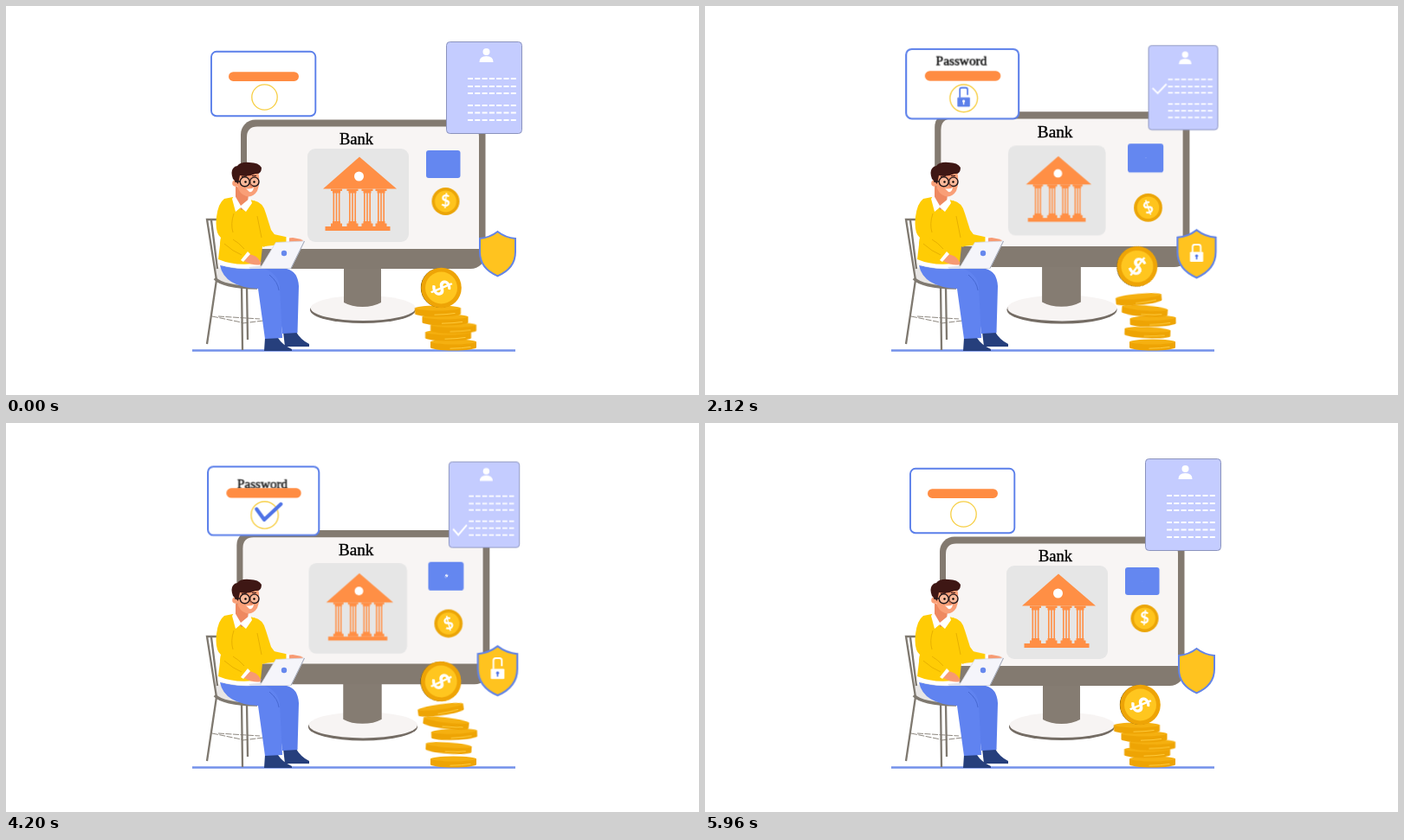
Animation, 800 px wide and 450 px high, one loop 6 s. Source, as an HTML page:

```html
<!DOCTYPE html>
<html lang="en">
<head>
<meta charset="utf-8">
<title>Secure banking</title>
<style>
  html, body { margin: 0; width: 100%; height: 100%; overflow: hidden; background: #fff; }
  svg { display: block; width: 100vw; height: 100vh; }
  text { font-family: "Liberation Serif", "Times New Roman", serif; text-anchor: middle; }
  .title { fill: #000; stroke: #000; stroke-width: .35; }
  .dollar { font-family: Lato, "Open Sans", sans-serif; font-weight: 800; fill: #fff; }

  g, path, text, rect, use { --sine: cubic-bezier(.37, 0, .63, 1); }

  /* slow six-second breathing */
  .swell { animation: swell 3s var(--sine) infinite alternate; }
  @keyframes swell { to { transform: scale(var(--s)); } }
  .card { transform-origin: 297px 90px; --s: 1.1; }
  .doc { transform-origin: 552px 94.5px; --s: .9; }
  .monitor { transform-origin: 412px 352px; --s: 1.052; }
  .panel { transform-origin: 406.5px 219px; --s: .906; }
  .bank { transform-origin: 408px 217.5px; --s: .817; }
  .shield { transform-origin: 567.5px 286.5px; --s: 1.12; animation-duration: 1.5s; }

  .drift { animation: drift 3s var(--sine) infinite alternate; }
  @keyframes drift { to { transform: translate(5px, 9px) scale(1.03); } }
  .lean { animation: lean 3s var(--sine) infinite alternate; }
  @keyframes lean { to { transform: rotate(-30deg); } }

  .word { animation: word 6s var(--sine) infinite; }
  @keyframes word {
    0%, 100% { transform: translateY(18px); }
    20%, 50% { transform: none; }
  }

  /* padlocks */
  .lock { animation: pop var(--d) var(--sine) infinite; }
  .lock .shackle { animation: open var(--d) var(--sine) infinite; }
  @keyframes pop {
    0%, 3% { transform: rotate(-180deg) scale(0); }
    28%, 76% { transform: none; }
    100% { transform: scale(0); }
  }
  @keyframes open {
    0%, 28%, 60%, 100% { transform: none; }
    37%, 50% { transform: translateY(-3.5px); }
  }
  .late { animation-name: late; }
  .late .shackle { animation-name: shut; }
  @keyframes late {
    0%, 48% { transform: rotate(90deg) scale(0); }
    67%, 82% { transform: none; }
    97%, 100% { transform: scale(0); }
  }
  @keyframes shut {
    0%, 74% { transform: translateY(-3.5px); }
    81%, 100% { transform: none; }
  }

  /* ticks */
  .tick { fill: none; stroke-dasharray: 1 2; animation: tick 3s linear infinite; }
  .second { animation-name: second; }
  @keyframes tick {
    0%, 1%, 48%, 100% { stroke-dashoffset: 1.1; }
    9%, 40.5% { stroke-dashoffset: 0; }
  }
  @keyframes second {
    0%, 50%, 97%, 100% { stroke-dashoffset: 1.1; }
    60%, 88% { stroke-dashoffset: 0; }
  }

  /* coins */
  .slab { animation: lift 3s var(--sine) infinite; }
  @keyframes lift {
    0%, 3%, 100% { transform: none; }
    43%, 50% { transform: translate(var(--x), var(--y)) rotate(var(--a)); }
  }
  .toss { animation: toss 3s var(--sine) infinite; }
  @keyframes toss {
    0%, 3%, 98%, 100% { transform: none; }
    53%, 58% { transform: translateY(-32px); }
  }
  .roll { animation: roll 3s var(--sine) infinite; }
  @keyframes roll {
    0%, 36%, 98%, 100% { transform: none; }
    58%, 63% { transform: translateX(-4px) rotate(-33deg); }
  }

  /* typing */
  .near, .far, .head { animation: 2s var(--sine) infinite; }
  .near { animation-name: near; transform-origin: 252px 270px; }
  .far { animation-name: far; }
  .head { animation-name: nod; transform-origin: 272px 224px; }
  @keyframes near { 0%, 15%, 100% { transform: none; } 45%, 72% { transform: rotate(-12deg); } }
  @keyframes far { 0%, 15%, 100% { transform: none; } 45%, 72% { transform: translate(-14px, 3px); } }
  @keyframes nod { 0%, 15%, 100% { transform: none; } 45%, 72% { transform: rotate(-2deg); } }
</style>
</head>
<body>
<svg viewBox="0 0 800 450">
  <defs>
    <clipPath id="above"><rect x="240" y="54" width="114" height="27"/></clipPath>
    <g id="column" fill="#ff8f45">
      <path d="M-6.500 211.500h13v2.500h-13zM-4.500 214h9v2.500h-9zM-4.500 249h9v2.500h-9zM-6.500 251.500h13v3.500h-13z"/>
      <path d="M-3.200 216v34M0 216v34M3.200 216v34" stroke="#ff8f45" stroke-width="1.600"/>
    </g>
    <g id="slab">
      <path d="M-26.500 -3.500v6.500a26.500 3.400 0 0 0 53 0v-6.500z" fill="#eea404"/>
      <ellipse cy="-3.500" rx="26.500" ry="2.900" fill="#f5b010"/>
      <path d="M-4 4.200q14 -.2 24 -1.800" stroke="#ffcb3c" fill="none"/>
    </g>
    <rect id="body" x="-7.700" y="-.5" width="15.400" height="11.500" rx="1"/>
    <path id="keyhole" d="M0 2.500a1.700 1.700 0 0 1 .8 3.200v2.600h-1.600v-2.600a1.700 1.700 0 0 1 .8 -3.200z"/>
    <path id="hoop" d="M-4.700 3.500v-10q0 -2.500 2.500 -2.500h4.400q2.500 0 2.500 2.500v6.500" fill="none" stroke-width="1.900"/>
  </defs>

  <!-- monitor -->
  <g class="swell monitor">
    <ellipse cx="412" cy="351.500" rx="61" ry="15.500" fill="#746c64"/>
    <ellipse cx="412.300" cy="349.500" rx="60.500" ry="14.500" fill="#f7f4f3"/>
    <path d="M390 300h43v43q-9 5 -21.500 5t-21.500 -5z" fill="#857c72"/>
    <rect x="271" y="131.500" width="282.500" height="172.500" rx="17" fill="#837a70"/>
    <path d="M278 281V152q0 -12.500 12 -12.500h245q11 0 11 11.500v130z" fill="#f8f5f4"/>
    <text class="title" x="404.500" y="160" font-size="18.500">Bank</text>
    <rect class="swell panel" x="348" y="165" width="117" height="108" rx="9" fill="#e6e6e6"/>
    <g class="swell bank">
      <path d="M408 174.500L451 211.500H366z" fill="#ff8f45"/>
      <circle cx="407.500" cy="197" r="5.500" fill="#fff"/>
      <use href="#column" x="381.500"/><use href="#column" x="400"/>
      <use href="#column" x="417"/><use href="#column" x="433"/>
      <rect x="368.500" y="255" width="75" height="5" fill="#ff8f45"/>
    </g>
    <rect x="485" y="167" width="39.500" height="32" rx="3" fill="#6487f0"/>
    <g transform="translate(505 183)">
      <g class="lock" style="--d:2s" fill="#fff">
        <use class="shackle" href="#hoop" stroke="#fff"/>
        <use href="#body"/><use href="#keyhole" fill="#4f73e6"/>
      </g>
    </g>
  </g>

  <g transform="translate(507.500 226)">
    <g class="drift">
      <circle r="16" fill="#eba508"/><circle r="12.500" fill="#ffc41d"/>
      <g class="lean"><text class="dollar" y="6.200" font-size="18">$</text></g>
    </g>
  </g>

  <!-- document -->
  <g class="swell doc">
    <rect x="508.500" y="41.500" width="87" height="106" rx="4" fill="#c4ccff" stroke="#8b93bd"/>
    <circle cx="554.500" cy="53" r="4" fill="#fff"/>
    <path d="M546.500 65q0 -7 8 -7t8 7z" fill="#fff"/>
    <path d="M533 84h56M533 93h56M533 101h56M533 115h56M533 123.500h56M533 132h56" stroke="#fff" stroke-width="1.900" stroke-dasharray="6 2.300"/>
    <g stroke="#fff" stroke-width="2.200">
      <path class="tick" pathLength="1" d="M513.500 124.500L520 132L530.500 119.500"/>
      <path class="tick second" pathLength="1" d="M513.500 95L520 101.500L531 90"/>
    </g>
  </g>

  <!-- password card -->
  <g class="swell card">
    <rect x="237" y="52.800" width="120.300" height="74.500" rx="6" fill="#fff" stroke="#5b7fea" stroke-width="1.900"/>
    <g clip-path="url(#above)">
      <text class="title word" x="296" y="70" font-size="14.200">Password</text>
    </g>
    <rect x="257" y="76.300" width="81" height="10.600" rx="5.300" fill="#ff8c42"/>
    <circle cx="298.500" cy="105.500" r="14.700" fill="#fff" stroke="#f7cf45" stroke-width="1.300"/>
    <path class="tick" pathLength="1" d="M289.700 99L298 110.500L316 93.600" stroke="#4f73e6" stroke-width="4" stroke-linecap="round" stroke-linejoin="round"/>
    <g transform="translate(298.500 105) scale(.87)">
      <g class="lock late" style="--d:3s" fill="#5b7fea">
        <use class="shackle" href="#hoop" stroke="#5b7fea"/>
        <use href="#body"/><use href="#keyhole" fill="#fff"/>
      </g>
    </g>
  </g>

  <!-- shield -->
  <g class="swell shield">
    <path d="M567.500 261q9 7 20.500 8v15.500q0 19 -20.500 27.800q-20.500 -8.800 -20.500 -27.800v-15.500q11.500 -1 20.500 -8z" fill="#ffc31f" stroke="#6384e6" stroke-width="2"/>
    <g transform="translate(567.500 285) scale(.92)">
      <g class="lock" style="--d:3s" fill="#fff">
        <use class="shackle" href="#hoop" stroke="#fff"/>
        <use href="#body"/><use href="#keyhole" fill="#4f73e6"/>
      </g>
    </g>
  </g>

  <path d="M215 398.500H588" stroke="#7391ea" stroke-width="2.600"/>

  <!-- coin stack -->
  <g transform="translate(516.500 392)"><use href="#slab"/></g>
  <g transform="translate(510.500 381)"><use class="slab" style="--x:.5px;--y:-5px;--a:4deg" href="#slab"/></g>
  <g transform="translate(516.500 372.500)"><use class="slab" style="--x:1px;--y:-12.500px;--a:-2deg" href="#slab"/></g>
  <g transform="translate(507 363)"><use class="slab" style="--x:1px;--y:-16px;--a:7deg" href="#slab"/></g>
  <g transform="translate(498.500 353)"><use class="slab" style="--x:3.500px;--y:-21.500px;--a:-8deg" href="#slab"/></g>
  <g transform="translate(502.500 326)">
    <g class="toss">
      <g class="roll">
        <circle cx="-.8" r="23" fill="#6b5215"/>
        <circle r="23.300" fill="#eea406"/><circle r="18.500" fill="#ffc61f"/>
        <text class="dollar" y="9.800" font-size="28" transform="rotate(62)">$</text>
      </g>
    </g>
  </g>

  <!-- chair -->
  <g fill="none" stroke="#7f7970" stroke-width="2.300">
    <path d="M241 303Q250 301 262 304L292 324Q256 326 243 316z" fill="#e8e6e5" stroke="none"/>
    <path d="M244 247h-12l11 70l-11 74M237 248l7 56M272 322l1 76M278 325l1 61"/>
    <path d="M241 315Q250 325 290 326" stroke-width="3.500"/>
    <path d="M238 359l34 7M245 359l48 3M273 367l24 -3" stroke-width=".9" stroke-dasharray="7 1.500"/>
  </g>

  <!-- legs -->
  <path d="M320 377h15q5 9 15 14v3h-28z" fill="#263f7c"/>
  <path d="M280 302L324 304Q337 307 338 324L336.500 378L319 379L313 326z" fill="#5a7deb"/>
  <path d="M299 384h15q5 8 16 13v2h-32z" fill="#263f7c"/>
  <path d="M247 300Q275 306 296 303Q313 308 316 324L319 384L299 385L291 327Q252 325 247 300z" fill="#6083f0"/>
  <path d="M304 311q10 8 11 18" stroke="#4668d2" fill="none"/>

  <!-- far arm -->
  <g class="far">
    <path d="M322 269l9 -1q7 1 12 3l-4 5l-16 -1z" fill="#f79a72"/>
    <path d="M300 262l25 5.500l1 7.500l-28 3z" fill="#ffcc05"/>
    <path d="M323.500 267l3.500 .5v7.500h-3.500z" fill="#fff"/>
  </g>
  <path d="M286 225Q297 227 300 240L306 259L315 271L297 279L284 260z" fill="#ffcc05"/>

  <!-- torso -->
  <path d="M245 292Q265 299 294 296L293 303Q262 306 245 298z" fill="#fff" stroke="#e8e4df" stroke-width=".5"/>
  <path d="M252 223L262 221L272 236L282 224Q292 226 296 234L299 262L296 278L294 297Q266 302 245 293L248 268Q241 262 243 244Q245 228 252 223z" fill="#ffcc05"/>
  <path d="M290 243l5 25M263 240q-4 12 -1 22" stroke="#e5ad00" stroke-width=".9" fill="none"/>

  <!-- head -->
  <g class="head">
    <path d="M265 208L280 217L279 227L272 236L265 223z" fill="#ee8961"/>
    <path d="M266 194L291 191Q294 205 290 214Q285 222 277 220Q269 217 267 208z" fill="#f99f77"/>
    <circle cx="265" cy="205" r="3.800" fill="#f99f77"/>
    <path d="M262 200Q259 192 262 188Q264 185 267 185Q271 180 281 181Q292 181 295 187Q295 195 288 194Q280 198 270 196L268 206L265 203z" fill="#3e1714"/>
    <path d="M272 197.500l6 -1M284 196.500l5 0" stroke="#3e1714" stroke-width="1.200"/>
    <g fill="#fcb99a" stroke="#20171a" stroke-width="1.400">
      <circle cx="275.700" cy="203.300" r="5.500"/><circle cx="286.800" cy="203.300" r="5.200"/>
      <path d="M264 203h6"/>
    </g>
    <circle cx="276.500" cy="203.500" r="1.200"/><circle cx="286.500" cy="203.500" r="1.200"/>
    <path d="M282 205l2.500 4h-3" fill="none" stroke="#d56b48" stroke-width=".8"/>
    <path d="M277 211q5 1.500 9 -1q-1 6 -5 5z" fill="#fff"/>
  </g>
  <path d="M264 219L271 231L282 222L284 228L277 238L271 233L265 238L261 223z" fill="#fff"/>

  <!-- near arm and laptop -->
  <g class="near">
    <path d="M277 287q8 0 13 4q5 5 4 8q-8 2 -19 -4z" fill="#f79a72"/>
    <path d="M249 261Q265 270 280 286L273 295Q254 288 247 275z" fill="#ffcc05"/>
    <path d="M279 284l3 3l-8 9l-3 -2z" fill="#fff"/>
    <path d="M252 275q10 9 20 13M262 270q7 4 13 11" stroke="#e5ad00" stroke-width=".9" fill="none"/>
  </g>
  <path d="M280 302L295 300.500L328 302L327 304H282z" fill="#dfe1ea"/>
  <path d="M311.500 273.500L344.500 272L329 303.500L293.500 303.500z" fill="#f5f5fa" stroke="#d5d8e2" stroke-width=".8" stroke-linejoin="round"/>
  <path d="M344.500 272L329 303.500" stroke="#a3a9b8"/>
  <circle cx="321" cy="286" r="3.200" fill="#6688ed"/>
</svg>
</body>
</html>
```
